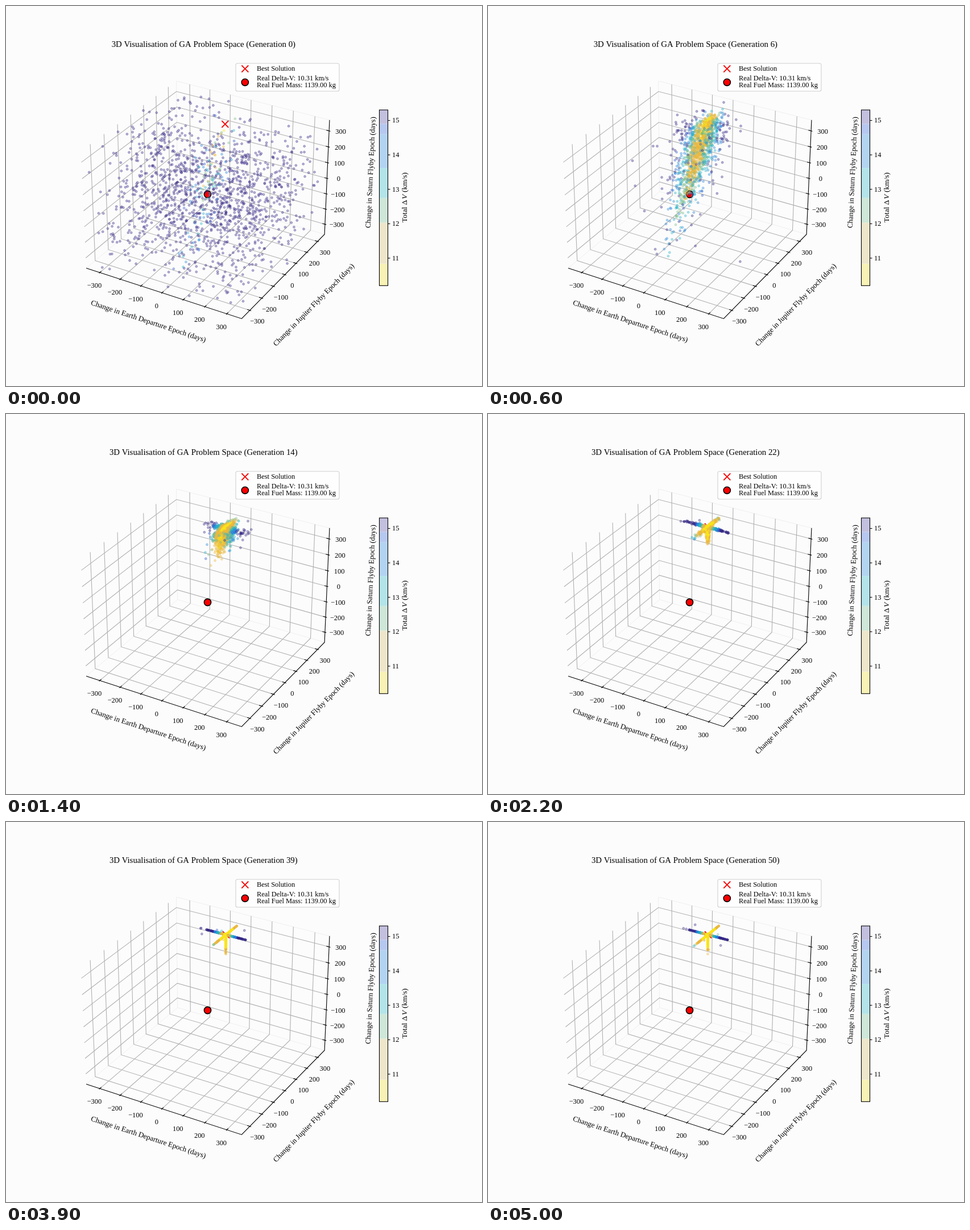
An HTML page with a canvas for the animation above (5.1 s loop, 837 px wide and 669 px high).

```html
<!DOCTYPE html>
<html lang="en">
<head>
<meta charset="utf-8">
<style>
  html, body { margin: 0; width: 100%; height: 100%; overflow: hidden; background: #fcfcfc; }
  canvas { display: block; }
</style>
</head>
<body>
<canvas id="stage" width="837" height="669"></canvas>
<script>
const ctx = document.getElementById('stage').getContext('2d');
const STEP = 100, GENERATIONS = 51, COUNT = 1450;
const LIMIT = 367, DATA = 360;
const TICKS = [-300, -200, -100, 0, 100, 200, 300];
const OPTIMUM = [-14, 176, 358];

// Cost bands from cheap to expensive: upper bound, point colour, colour bar tint
const BANDS = [
  [10.84, '249,229,30', '#f8f2b6'],
  [12.03, '234,186,66', '#ede6cb'],
  [12.75, '126,190,140', '#cee7d8'],
  [13.62, '38,178,200', '#b3e4ea'],
  [14.6, '42,136,218', '#b3d4f1'],
  [14.9, '50,92,208', '#b6c8f0'],
  [15.3, '54,42,135', '#c3c0df']
];

// Perspective camera: elevation 30, azimuth -60, distance 10
function project([x, y, z]) {
  x *= 0.5714 / LIMIT; y *= 0.5714 / LIMIT; z *= 0.4286 / LIMIT;
  const distance = 10 - (0.433 * x - 0.75 * y + 0.5 * z);
  const scale = 2741 / distance;
  return [
    354.3 + scale * (0.866 * x + 0.5 * y),
    331.6 - scale * (-0.25 * x + 0.433 * y + 0.866 * z),
    distance
  ];
}

function line(color, width, ...points) {
  ctx.strokeStyle = color;
  ctx.lineWidth = width;
  ctx.beginPath();
  for (const [x, y] of points) ctx.lineTo(x, y);
  ctx.stroke();
}

const line3 = (color, width, ...points) => line(color, width, ...points.map(project));

function text(str, x, y, size, align = 'center', degrees = 0, style = '') {
  ctx.save();
  ctx.translate(x, y);
  ctx.rotate(degrees * Math.PI / 180);
  ctx.font = `${style} ${size}px "Liberation Serif", serif`;
  ctx.textAlign = align;
  ctx.fillStyle = '#000';
  ctx.fillText(str, 0, size * 0.32);
  ctx.restore();
}

function cross(x, y) {
  line('#f01010', 1.8, [x - 6, y - 6], [x + 6, y + 6]);
  line('#f01010', 1.8, [x - 6, y + 6], [x + 6, y - 6]);
}

function disc(x, y) {
  ctx.beginPath();
  ctx.arc(x, y, 6.1, 0, 7);
  ctx.fillStyle = '#f00';
  ctx.fill();
  ctx.strokeStyle = '#000';
  ctx.lineWidth = 1.6;
  ctx.stroke();
}

function tickLabel(value, at, dx, dy) {
  const [x, y] = project(at);
  text(String(value).replace('-', '\u2212'), x + dx, y + dy, 12.4);
}

function drawAxes() {
  const A = -LIMIT, B = LIMIT;
  const edge = '#f0f0f0', grid = '#b0b0b0';
  line3(edge, 1, [A, A, A], [A, B, A], [A, B, B], [B, B, B]);
  line3(edge, 1, [A, B, A], [B, B, A]);
  for (const t of TICKS) {
    line3(grid, 1.1, [t, A, A], [t, B, A], [t, B, B]);
    line3(grid, 1.1, [B, t, A], [A, t, A], [A, t, B]);
    line3(grid, 1.1, [A, A, t], [A, B, t], [B, B, t]);
  }
  line3('#000', 1.1, [A, A, A], [B, A, A], [B, B, A], [B, B, B]);
  for (const t of TICKS) {
    line3('#000', 1.1, [t, A + 12, A], [t, A - 6, A]);
    line3('#000', 1.1, [B - 12, t, A], [B + 6, t, A]);
    line3('#000', 1.1, [B - 12, B, t], [B + 6, B, t]);
    tickLabel(t, [t, A, A], -9.5, 23);
    tickLabel(t, [B, t, A], 13, 19.5);
    tickLabel(t, [B, B, t], 20.5, 1);
  }
  text('Change in Earth Departure Epoch (days)', 250.5, 555, 13, 'center', 18.2);
  text('Change in Jupiter Flyby Epoch (days)', 541, 526, 13, 'center', -45.6);
  text('Change in Saturn Flyby Epoch (days)', 641, 293, 13, 'center', -87.4);
}

function drawColorBar() {
  const toY = cost => 201.5 + (15 - cost) * 60.6;
  let bottom = 492;
  for (const [limit, , tint] of BANDS) {
    const top = Math.max(183, toY(limit));
    ctx.fillStyle = tint;
    ctx.fillRect(656, top, 15, bottom - top);
    bottom = top;
  }
  ctx.strokeStyle = '#000';
  ctx.lineWidth = 1.1;
  ctx.strokeRect(656.5, 183, 15, 309.3);
  for (let v = 11; v <= 15; v++) {
    line('#000', 1.1, [671.5, toY(v)], [675.5, toY(v)]);
    text(v, 679, toY(v), 12.4, 'left');
  }
  text('Total Δ', 701, 381, 13.4, 'left', -90);
  text('V', 701, 340, 13.4, 'left', -90, 'italic');
  text('(km/s)', 701, 293, 13.4, 'right', -90);
}

function drawLegend() {
  ctx.beginPath();
  ctx.roundRect(404, 101, 182, 49, 3);
  ctx.fillStyle = 'rgba(255,255,255,.8)';
  ctx.fill();
  ctx.strokeStyle = '#d0d0d0';
  ctx.lineWidth = 1.1;
  ctx.stroke();
  cross(420.3, 110.5);
  disc(420.3, 134.3);
  text('Best Solution', 441, 110.5, 12.4, 'left');
  text('Real Delta-V: 10.31 km/s', 441, 127, 12.4, 'left');
  text('Real Fuel Mass: 1139.00 kg', 441, 139.5, 12.4, 'left');
}

function randomFrom(seed) {
  return () => {
    seed = seed + 0x6D2B79F5 | 0;
    let t = Math.imul(seed ^ seed >>> 15, 1 | seed);
    t = t + Math.imul(t ^ t >>> 7, 61 | t) ^ t;
    return ((t ^ t >>> 14) >>> 0) / 4294967296;
  };
}

const clamp = (v, lo, hi) => Math.min(hi, Math.max(lo, v));
const valleyY = z => OPTIMUM[1] + 0.48 * (z - OPTIMUM[2]);

function costOf([x, y, z]) {
  const slope = 0.042 + 0.043 * clamp((z - 220) / 130, 0, 1);
  const off = (y - valleyY(z)) / 72;
  return 10.2 + slope * Math.abs(x - OPTIMUM[0]) + off * off + 0.0045 * (OPTIMUM[2] - z);
}

// Scattered start, then a shrinking valley, then one-axis mutations around the optimum
function population(gen) {
  const rnd = randomFrom(gen * 7919 + 17);
  const gauss = () => Math.sqrt(-2 * Math.log(1 - rnd())) * Math.cos(6.2832 * rnd());
  const bound = v => clamp(v, -DATA, DATA);
  const shrink = Math.exp((6 - gen) / 6);
  const width = Math.sqrt(shrink);
  const scattered = 0.39 ** gen;
  const star = clamp((gen - 9) / 11, 0, 1);
  const jitter = 20 * Math.exp((10 - gen) / 7);

  function scatter() {
    const v = 2 * rnd() - 1;
    return DATA * Math.sign(v) * Math.abs(v) ** 1.3;
  }

  function sample() {
    if (rnd() < scattered) return [scatter(), scatter(), scatter()];
    if (rnd() < star) {
      const p = OPTIMUM.map(v => v + gauss() * jitter);
      const mutate = () => {
        p[Math.floor(rnd() * 3)] += clamp(gauss() * 42, -120, 92);
      };
      if (rnd() < 0.7) mutate();
      if (rnd() < 0.01) mutate();
      p[2] = OPTIMUM[2] - Math.abs(p[2] - OPTIMUM[2]);
      return p.map(bound);
    }
    const wide = rnd() < 0.08 ? 2 : 1;
    const z = Math.max(-DATA, OPTIMUM[2] - Math.abs(gauss()) * 200 * Math.min(shrink, 1.5));
    const g = gauss();
    const x = OPTIMUM[0] + g * Math.sqrt(Math.abs(g)) * 25 * wide * width;
    const y = valleyY(z) + gauss() * 44 * wide * width;
    return [bound(x), bound(y), z];
  }

  return Array.from({ length: COUNT }, () => {
    const p = sample();
    const [x, y, distance] = project(p);
    return { x, y, distance, cost: costOf(p) };
  }).sort((a, b) => b.distance - a.distance);
}

function drawPoints(gen) {
  ctx.lineWidth = 1;
  for (const { x, y, cost } of population(gen)) {
    const [, rgb] = BANDS.find(([limit]) => cost < limit) || BANDS[6];
    ctx.fillStyle = `rgba(${rgb},.33)`;
    ctx.strokeStyle = `rgba(${rgb},.4)`;
    ctx.beginPath();
    ctx.arc(x, y, 1.9, 0, 7);
    ctx.fill();
    ctx.stroke();
  }
}

function draw(gen) {
  ctx.fillStyle = '#fcfcfc';
  ctx.fillRect(0, 0, 837, 669);
  drawAxes();
  if (gen < 10) cross(385.3, 208);
  else cross(387, 198.5);
  disc(354.5, 331.5);
  drawPoints(gen);
  drawColorBar();
  drawLegend();
  text(`3D Visualisation of GA Problem Space (Generation ${gen})`, 347.3, 67.5, 14.8);
}

let shown = -1;
function tick() {
  const gen = Math.floor(performance.now() / STEP) % GENERATIONS;
  if (gen !== shown) draw(shown = gen);
  requestAnimationFrame(tick);
}
tick();
</script>
</body>
</html>
```
